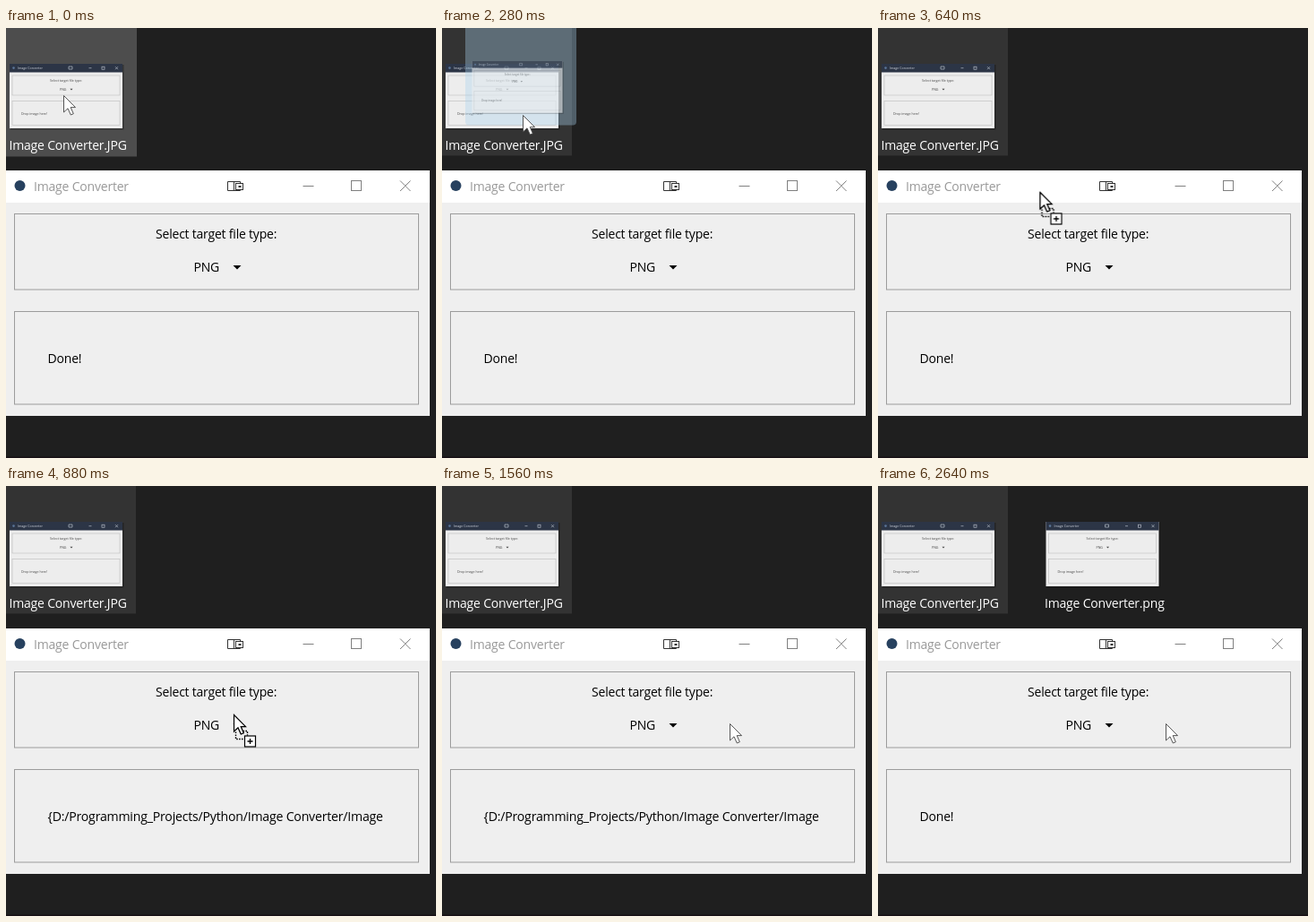
An HTML page that plays this animation: 480x480 px, repeating every 3440 ms.

```html
<!DOCTYPE html>
<html lang="en">
<head>
<meta charset="utf-8">
<title>Image Converter</title>
<style>
  html, body { margin: 0; width: 100%; height: 100%; overflow: hidden; background: #1f1f1f; }
  svg { display: block; width: 100vw; height: 100vh; }
  text { font: 14px "Open Sans", "Noto Sans", sans-serif; letter-spacing: -.2px; }
  .label { fill: #fff; }
  .path { font-size: 14.1px; }
  .tiny text { font-size: 3.6px; letter-spacing: 0; }
  .line { fill: none; stroke: #9c9c9c; }
  .caption { fill: none; stroke: #808080; }

  /* The small negative delay keeps steps clear of the 40 ms ticks. */
  .anim { animation: 3440ms step-end -2ms infinite; }
  .hover { animation-name: hover; }
  .drag { animation-name: drag; }
  .copy { animation-name: copy; }
  .path { animation-name: path; }
  .done { animation-name: done; }
  .result { animation-name: result; }
  .pointer { animation-name: move; }

  @keyframes hover { 0% { opacity: 1 } 4.651%, 100% { opacity: 0 } }
  @keyframes drag { 0% { opacity: 0 } 4.651% { opacity: 1 } 16.279%, 100% { opacity: 0 } }
  @keyframes copy { 0% { opacity: 0 } 17.442% { opacity: 1 } 45.349%, 100% { opacity: 0 } }
  @keyframes path { 0% { opacity: 0 } 25.581% { opacity: 1 } 46.512%, 100% { opacity: 0 } }
  @keyframes done { 0% { opacity: 1 } 25.581% { opacity: 0 } 46.512%, 100% { opacity: 1 } }
  @keyframes result { 0% { opacity: 0 } 76.744%, 100% { opacity: 1 } }
  @keyframes move {
    0% { transform: translate(64px, 75px); animation-timing-function: steps(3) }
    3.488% { transform: translate(68px, 78px); animation-timing-function: steps(4) }
    8.140% { transform: translate(90px, 97px); animation-timing-function: steps(4) }
    12.791% { transform: translate(130px, 132px) }
    15.116% { transform: translate(142px, 145px) }
    16.279% { transform: translate(156px, 159px); animation-timing-function: steps(8) }
    25.581% { transform: translate(254px, 255px); animation-timing-function: steps(4) }
    30.233%, 100% { transform: translate(321px, 265px) }
  }
</style>
</head>
<body>
<svg viewBox="0 0 480 480">
  <defs>
    <g id="thumb" class="tiny">
      <rect x="1" y="1" width="126.500" height="72.500" fill="#111" opacity=".4"/>
      <rect width="126" height="72" fill="#ededed"/>
      <rect width="126" height="9.500" fill="#2c3546"/>
      <circle cx="4.500" cy="4.600" r="1.300" fill="#5b7597"/>
      <text x="9" y="6" fill="#d0d5dd">Image Converter</text>
      <g fill="none" stroke="#b4bac5" stroke-width=".7">
        <path d="M66 3h4v3h-4zM88.500 4.700h3M118 3.200l3 3m0-3l-3 3"/>
        <rect x="103" y="3.200" width="3" height="3"/>
      </g>
      <g fill="none" stroke="#bbb" stroke-width=".6">
        <rect x="3" y="13" width="120" height="22"/>
        <rect x="3" y="41.500" width="120" height="27"/>
      </g>
      <g fill="#444">
        <text x="63" y="20.300" text-anchor="middle">Select target file type:</text>
        <text x="56" y="29.800">PNG</text>
        <path d="M67.500 27.800h3l-1.500 1.600z"/>
        <text x="13" y="56.500">Drop image here!</text>
      </g>
    </g>
    <path id="arrow" d="M.5 .5V19L5 14.800 8.300 22l3-1.300L8.200 13.600h5.300z"/>
  </defs>

  <rect width="480" height="480" fill="#1f1f1f"/>
  <rect y="478.500" width="480" height="1.500" fill="#171015"/>

  <!-- files -->
  <rect width="145" height="142.500" fill="#333"/>
  <rect class="anim hover" width="146" height="143.500" fill="#4d4d4d"/>
  <use href="#thumb" x="4" y="40"/>
  <text class="label" x="3.500" y="136">Image Converter.JPG</text>
  <g class="anim result">
    <use href="#thumb" x="187.500" y="40"/>
    <text class="label" x="186" y="136">Image Converter.png</text>
  </g>

  <!-- window -->
  <rect y="159" width="473" height="274" fill="#efefef"/>
  <rect y="159" width="473" height="36" fill="#fff"/>
  <circle cx="15.500" cy="176" r="6" fill="#27415f"/>
  <text x="31" y="181.500" fill="#999">Image Converter</text>
  <g fill="none" stroke="#333">
    <path d="M247.500 171.500h14v10h-14zM254.500 171.500v10"/>
    <rect x="256.500" y="173.500" width="8" height="7" fill="#fff"/>
    <path d="M259.500 177h3" stroke-width="2"/>
  </g>
  <path class="caption" d="M331.500 176.500h12M440 170.500l11.500 11.500m0-11.500L440 182"/>
  <rect class="caption" x="385.500" y="170.500" width="11" height="11"/>
  <rect class="line" x="9.500" y="207.500" width="451" height="84.500"/>
  <rect class="line" x="9.500" y="316.500" width="451" height="103.500"/>
  <text x="167" y="235">Select target file type:</text>
  <text x="209.500" y="272">PNG</text>
  <path d="M253.500 265h9l-4.500 4.500z"/>
  <text class="anim done" x="46.500" y="373.500">Done!</text>
  <text class="anim path" x="46.500" y="373.500">{D:/Programming_Projects/Python/Image Converter/Image</text>

  <!-- pointer with its dragged file -->
  <g class="anim pointer">
    <g class="anim drag">
      <rect x="-64" y="-112" width="124" height="123.500" rx="4" fill="#aad2ee" fill-opacity=".36"/>
      <use href="#thumb" transform="translate(-56.500 -60) scale(.802)" opacity=".58"/>
    </g>
    <use href="#arrow" fill="#fff" stroke="#444" stroke-width=".9"/>
    <g class="anim copy" fill="none" stroke="#000">
      <use href="#arrow" fill="#fff" stroke-width="1.200"/>
      <path d="M10.500 18.500h5v5M2.500 19.500v8h8" stroke-width="1.400" stroke-dasharray="1.600 1.300"/>
      <rect x="12.500" y="24" width="12" height="12" fill="#fff" stroke-width="1.200"/>
      <path d="M15.500 30h6M18.500 27v6" stroke-width="1.300"/>
    </g>
  </g>
</svg>
</body>
</html>
```
